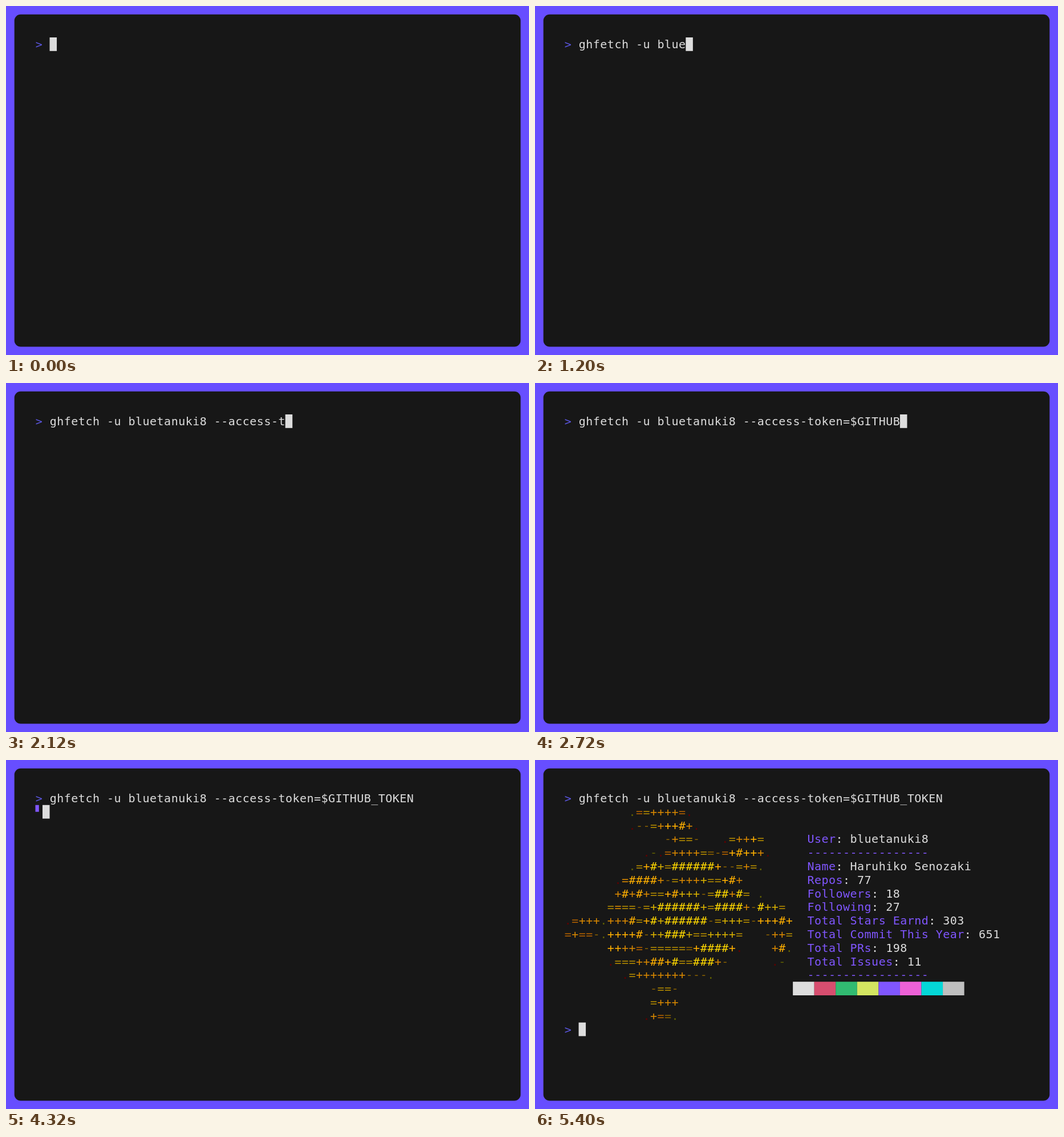
An HTML page with a canvas that plays this animation: 917x611 px, repeating every 8 s.

```html
<!DOCTYPE html>
<html lang="en">
<head>
<meta charset="utf-8">
<title>Terminal session</title>
<style>
  html, body { margin: 0; width: 917px; height: 611px; overflow: hidden; background: #674eff; }
  canvas { display: block; }
</style>
</head>
<body>
<canvas id="stage" width="917" height="611"></canvas>
<script>
const ctx = document.getElementById('stage').getContext('2d');

const LOOP = 8000, TICK = 40;
const LEFT = 51.5, TOP = 55, CELL_W = 12.52, CELL_H = 23.8, BASELINE = 18.9;
const FG = '#dddddd', PROMPT = '#5b56e0', BLUE = '#8056ff';

const TYPE_START = 470, TYPE_STEP = 50.62;
const ENTER = 3600, SPIN_START = 4040, DONE = 5400;

const USER = 'bluetanuki8';
const COMMAND = `ghfetch -u ${USER} --access-token=$GITHUB_TOKEN`;

// Each line: start column, characters, colour keys
const ART = [
  [9,  '.==++++=.', 'onyddddnr'],
  [9,  '.--=+++#+.', 'rbbydfffdr'],
  [14, '-+==-   .=+++=', 'bdyyb   ryddfy'],
  [11, '.-.=++++==-=+#+++.', 'rornddddybbnffffdr'],
  [9,  '.=+#+=######+--=+=.', 'oyfFgyFFFFFFfbbydyo'],
  [7,  '.=####+-=++++==+#+', 'rdffffdbydddgyyffd'],
  [7,  '+#+#+==+#+++-=##+#= .', 'dfdfdyyffgggbyFFdFy o'],
  [6,  '====-=+######+=####+-#++=', 'ydyybygFFFFFFgyFFFFdbFggy'],
  [0,  '.=+++.+++#=+#+######-=+++=-+++#+', 'rndddodddfyfFgFFFFFFbygggybfffff'],
  [0,  '=+==-.++++#-++###+==++++=   -++=', 'ndnnbofffffbggFFFgyyggggy   bddy'],
  [6,  '++++=-======+####+.    +#.', 'ffddnbyyyyybfFFFFfr    dfo'],
  [6,  '.===++##+#==###+-      .-', 'ryyyddfffFyyFFFdb      ro'],
  [8,  '.=+++++++---.', 'rydddddddbbbo'],
  [12, '-==-', 'byyb'],
  [12, '=+++', 'yddd'],
  [11, '.+==.', 'rdnbo']
];
const SHADES = {
  r: '#5f0000', o: '#5f5f00', b: '#875f00', n: '#af5f00', y: '#af8700',
  d: '#d78700', g: '#d7af00', f: '#ffaf00', F: '#ffd700'
};

const RULE = '-'.repeat(17);
const INFO = [
  ['User', USER], [RULE], ['Name', 'Haruhiko Senozaki'], ['Repos', '77'],
  ['Followers', '18'], ['Following', '27'], ['Total Stars Earnd', '303'],
  ['Total Commit This Year', '651'], ['Total PRs', '198'], ['Total Issues', '11'], [RULE]
];
const PALETTE = [FG, '#d74e6f', '#31bb71', '#d3e561', BLUE, '#ed61d7', '#04d7d7', '#bfbfbf'];

// Quadrant offsets of the spinner block, in half cells
const SPINNER = [[0, 1], [0, 0], [1, 0], [1, 1]];

function block(col, row, color, w = 1, h = 1) {
  ctx.fillStyle = color;
  ctx.fillRect(LEFT + col * CELL_W, TOP + row * CELL_H, w * CELL_W, h * CELL_H);
}

function print(col, row, text, color) {
  ctx.fillStyle = color;
  [...text].forEach((ch, i) =>
    ctx.fillText(ch, LEFT + (col + i) * CELL_W + 0.25, TOP + row * CELL_H + BASELINE));
}

const cursor = (col, row) => block(col, row, FG);

function drawReport() {
  ART.forEach(([col, chars, keys], row) => {
    [...chars].forEach((ch, i) => {
      if (ch !== ' ') print(col + i, row + 1, ch, SHADES[keys[i]]);
    });
  });
  INFO.forEach(([label, value], i) => {
    print(34, i + 3, label, BLUE);
    if (value) print(34 + label.length, i + 3, ': ' + value, FG);
  });
  PALETTE.forEach((color, i) => block(32 + i * 3, 14, color, 3));
  print(0, 17, '>', PROMPT);
  cursor(2, 17);
}

function draw(time) {
  const tick = Math.floor((time % LOOP) / TICK);
  const t = tick * TICK;

  ctx.fillStyle = '#674eff';
  ctx.fillRect(0, 0, 917, 611);
  ctx.fillStyle = '#171717';
  ctx.beginPath();
  ctx.roundRect(14.7, 14.7, 887.6, 581.8, 11);
  ctx.fill();

  ctx.font = '20px "DejaVu Sans Mono", monospace';
  const typed = Math.max(0, Math.min(COMMAND.length, Math.floor((t - TYPE_START) / TYPE_STEP) + 1));
  print(0, 0, '>', PROMPT);
  print(2, 0, COMMAND.slice(0, typed), FG);

  if (t < ENTER) {
    cursor(2 + typed, 0);
  } else if (t >= DONE) {
    drawReport();
  } else if (t >= SPIN_START) {
    const [x, y] = SPINNER[(tick + 1) % 4];
    block(x / 2, 1 + y / 2, BLUE, 0.5, 0.5);
    cursor(1, 1);
  }
}

const start = performance.now();
(function loop() {
  draw(performance.now() - start);
  requestAnimationFrame(loop);
})();
</script>
</body>
</html>
```
